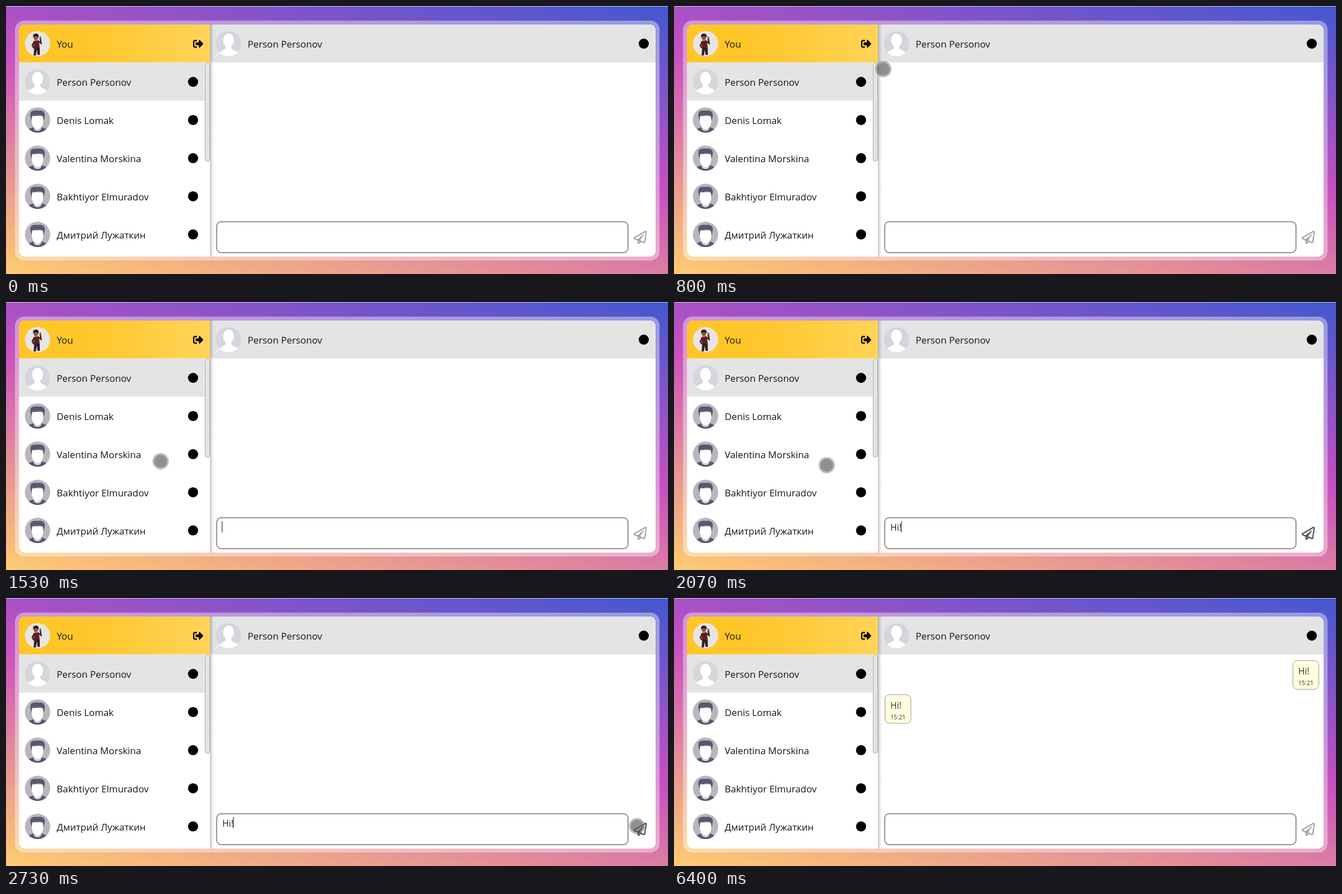
These frames come from a looping animation (1175 px wide and 477 px high, 8 s). An HTML page with a canvas:

```html
<!DOCTYPE html>
<html lang="en">
<head>
<meta charset="utf-8">
<title>Chat</title>
<style>
  html, body { margin: 0; width: 100%; height: 100%; overflow: hidden; }
  canvas { display: block; width: 1175px; height: 477px; }
</style>
</head>
<body>
<canvas id="stage"></canvas>
<script>
const W = 1175, H = 477, LOOP = 8000, TICK = 200 / 3;
const canvas = document.getElementById('stage');
const ctx = canvas.getContext('2d');
const dpr = window.devicePixelRatio || 1;
canvas.width = W * dpr;
canvas.height = H * dpr;

const FONT = '"Open Sans", "Noto Sans", sans-serif';
const GREY = '#e4e4e4';
const FRIEND = 'Person Personov';
const contacts = [FRIEND, 'Denis Lomak', 'Valentina Morskina', 'Bakhtiyor Elmuradov', 'Дмитрий Лужаткин'];

const exitIcon = new Path2D('M497 273L329 441c-15 15-41 4.500-41-17v-96H152c-13.300 0-24-10.700-24-24v-96c0-13.300 10.700-24 24-24h136V88c0-21.400 25.900-32 41-17l168 168c9.300 9.400 9.300 24.600 0 34zM192 436v-40c0-6.600-5.400-12-12-12H96c-17.700 0-32-14.300-32-32V160c0-17.700 14.300-32 32-32h84c6.600 0 12-5.400 12-12V76c0-6.600-5.400-12-12-12H96c-53 0-96 43-96 96v192c0 53 43 96 96 96h84c6.600 0 12-5.400 12-12z');
const planeIcon = new Path2D('M440 6.500L24 246.400c-34.400 19.900-31.100 70.800 5.700 85.900L144 379.600V464c0 46.400 59.200 65.500 86.600 28.600l43.800-59.100 111.900 46.200c5.900 2.400 12.100 3.600 18.300 3.600 8.200 0 16.300-2.100 23.600-6.200 12.800-7.200 21.600-20 23.900-34.500l59.400-387.200c6.100-40.100-36.900-68.800-71.500-48.900zM192 464v-64.600l36.600 15.100L192 464zm212.600-28.700l-153.800-63.500L391 169.500c10.700-15.500-9.500-33.500-23.700-21.200L155.800 332.600 48 288 464 48l-59.400 387.300z');

// pointer stops: time, x, y
const pathIn = [
  [467, 707, 43], [600, 562, 58], [800, 372, 112], [933, 296, 195],
  [1067, 267, 259], [1133, 266, 268], [1267, 274.5, 281.5], [1333, 274.5, 283.5]
];
const pathOut = [
  [1933, 274.5, 283.5], [2067, 271, 290.5], [2133, 335, 296], [2200, 490, 299],
  [2333, 865.5, 294], [2467, 1055, 358], [2600, 1118, 404], [2733, 1120, 406]
];

function rect(x, y, w, h, fill) {
  ctx.fillStyle = fill;
  ctx.fillRect(x, y, w, h);
}

function round(x, y, w, h, r, fill, stroke, line = 1) {
  ctx.beginPath();
  ctx.roundRect(x, y, w, h, r);
  if (fill) { ctx.fillStyle = fill; ctx.fill(); }
  if (stroke) { ctx.strokeStyle = stroke; ctx.lineWidth = line; ctx.stroke(); }
}

function ellipse(x, y, rx, ry, fill) {
  ctx.beginPath();
  ctx.ellipse(x, y, rx, ry, 0, 0, 2 * Math.PI);
  ctx.fillStyle = fill;
  ctx.fill();
}

const disc = (x, y, r, fill) => ellipse(x, y, r, r, fill);

function shape(d, fill) {
  ctx.fillStyle = fill;
  ctx.fill(new Path2D(d));
}

function text(s, x, y, size = 16.8, color = '#151515') {
  ctx.font = `${size}px ${FONT}`;
  ctx.fillStyle = color;
  ctx.fillText(s, x, y);
}

function icon(path, x, y, size, fill) {
  ctx.save();
  ctx.translate(x, y);
  ctx.scale(size / 512, size / 512);
  ctx.fillStyle = fill;
  ctx.fill(path);
  ctx.restore();
}

function gradient(x0, y0, x1, y1, stops) {
  const g = ctx.createLinearGradient(x0, y0, x1, y1);
  stops.forEach(([at, color]) => g.addColorStop(at, color));
  return g;
}

// Round avatar; the figure is drawn around its centre
function avatar(x, y, back, figure) {
  ctx.save();
  ctx.translate(x, y);
  disc(0, 0, 22.5, back);
  ctx.beginPath();
  ctx.arc(0, 0, 22.5, 0, 2 * Math.PI);
  ctx.clip();
  figure();
  ctx.restore();
}

function blank() {
  ellipse(0, -6, 9.6, 12, '#fff');
  shape('M-5 1V8C-6 12-17 12-18 19V24H18V19C17 12 6 12 5 8V1Z', '#fff');
}

function student() {
  shape('M-19 24C-18 15-12 14-7 13H7C12 14 18 15 19 24Z', '#5c566e');
  shape('M-7 12H7L6 17Q0 22-6 17Z', '#d6d6da');
  shape('M-10-7H10V5Q8 15 0 16Q-8 15-10 5Z', '#fff');
  shape('M-11 1L-13-9Q-13-17-5-17H6Q13-16 13-8L11 1L9-7Q4-9-2-8Q-7-7-9-8Z', '#5c566e');
}

function dancer() {
  shape('M-7-5L2-6L4 8L-6 9Z', '#571f25');
  shape('M-6 8H4L4 20H0L-1 11L-3 21H-7Z', '#332024');
  ctx.lineCap = 'round';
  ctx.lineWidth = 3;
  ctx.strokeStyle = '#571f25';
  ctx.stroke(new Path2D('M1-4L6-1L5-8M-6-3L-9 3L-7 7'));
  disc(5, -11, 1.8, '#8d5839');
  ellipse(-3, -11, 4, 5, '#8d5839');
  shape('M-8-11Q-9-18-3-18Q3-18 2-11Q-2-14-6-13Z', '#292124');
}

function backdrop() {
  const a = 12 * Math.PI / 180, s = Math.sin(a), c = Math.cos(a);
  const half = (W * s + H * c) / 2;
  rect(0, 0, W, H, gradient(W / 2 + s * half, H / 2 - c * half, W / 2 - s * half, H / 2 + c * half,
    [[0, '#4158d0'], [.46, '#c850c0'], [1, '#ffcc70']]));
  rect(0, 0, W, 1, 'rgba(235,235,235,.8)');
  ctx.beginPath();
  ctx.roundRect(16, 26, 1144, 427, 16);
  ctx.roundRect(23, 33, 1130, 413, 10);
  ctx.fillStyle = 'rgba(255,255,255,.4)';
  ctx.fill('evenodd');
}

function sidebar() {
  rect(23, 33, 339, 67.5, gradient(23, 0, 362, 0, [[0, '#ffc524'], [.4, '#ffc72e'], [1, '#ffd457']]));
  avatar(56, 67, '#e7e5e4', dancer);
  text('You', 90, 74);
  icon(exitIcon, 332, 58, 18.5, '#000');
  rect(23, 100.5, 329.5, 68, GREY);
  contacts.forEach((name, i) => {
    const y = 135 + i * 67.9;
    if (i) avatar(56, y, '#b6b6bf', student);
    else avatar(56, y, '#d3d6dc', blank);
    text(name, 90, y + 7);
    disc(332, y, 9, '#000');
  });
  round(353.5, 100.5, 8, 176, 4, GREY, '#a9a9a9');
}

function bubble(x, y, w) {
  round(x + .5, y + .5, w - 1, 51, 8, '#ffffdf', '#999');
  text('Hi!', x + 10, y + 25, 15.7, '#333');
  text('15:21', x + 10, y + 44, 10.6, '#333');
}

function chat(t) {
  rect(362, 33, 791, 67.5, GREY);
  avatar(395, 67, '#d3d6dc', blank);
  text(FRIEND, 429, 74);
  disc(1132, 67, 9, '#000');
  rect(362, 33, 7, 413, gradient(362, 0, 369, 0,
    [[0, 'rgba(0,0,0,.24)'], [.5, 'rgba(0,0,0,.09)'], [1, 'rgba(0,0,0,0)']]));

  round(374, 384, 730, 55, 8, '#fff', '#939591', 2);
  const focused = t >= 1533 && t < 2800;
  const typed = !focused || t < 1866 ? '' : t < 1933 ? 'H' : t < 2066 ? 'Hi' : 'Hi!';
  text(typed, 384, 407, 15.7, '#222');
  if (focused) rect(typed ? Math.round(383.3 + ctx.measureText(typed).width) : 383, 390, 1, 20, '#111');
  icon(planeIcon, 1114, 400, 23.5, typed ? '#505050' : '#a6a6a6');

  if (t >= 2933) bubble(1098, 111, 47);
  if (t >= 6400) bubble(374, 171.5, 47);
}

// Smooth curve through the stops
function along(stops, t) {
  const last = stops.length - 1;
  if (t >= stops[last][0]) return stops[last].slice(1);
  let i = 0;
  while (i < last - 1 && t >= stops[i + 1][0]) i++;
  const a = stops[i], b = stops[i + 1], span = b[0] - a[0];
  const u = Math.max(0, (t - a[0]) / span);
  const slope = (j, k) => {
    const p = stops[Math.max(0, j - 1)], n = stops[Math.min(last, j + 1)];
    return (n[k] - p[k]) / (n[0] - p[0]) * span;
  };
  return [1, 2].map(k =>
    (1 + 2 * u) * (1 - u) ** 2 * a[k] + u * (1 - u) ** 2 * slope(i, k) +
    u * u * (3 - 2 * u) * b[k] + u * u * (u - 1) * slope(i + 1, k));
}

function pointer(t) {
  if (t < 466 || t >= 2866) return;
  const [x, y] = along(t < 1933 ? pathIn : pathOut, t);
  disc(x, y, 14.5, 'rgba(90,90,90,.4)');
  disc(x, y, 11.3, 'rgba(100,100,100,.5)');
}

function draw(t) {
  ctx.setTransform(dpr, 0, 0, dpr, 0, 0);
  backdrop();
  ctx.save();
  ctx.beginPath();
  ctx.roundRect(23, 33, 1130, 413, 10);
  ctx.clip();
  rect(23, 33, 1130, 413, '#fff');
  sidebar();
  chat(t);
  ctx.restore();
  pointer(t);
}

function loop() {
  const t = performance.now() % LOOP;
  draw(Math.floor((t + 4) / TICK) * TICK + .5);
  requestAnimationFrame(loop);
}
loop();
</script>
</body>
</html>
```
